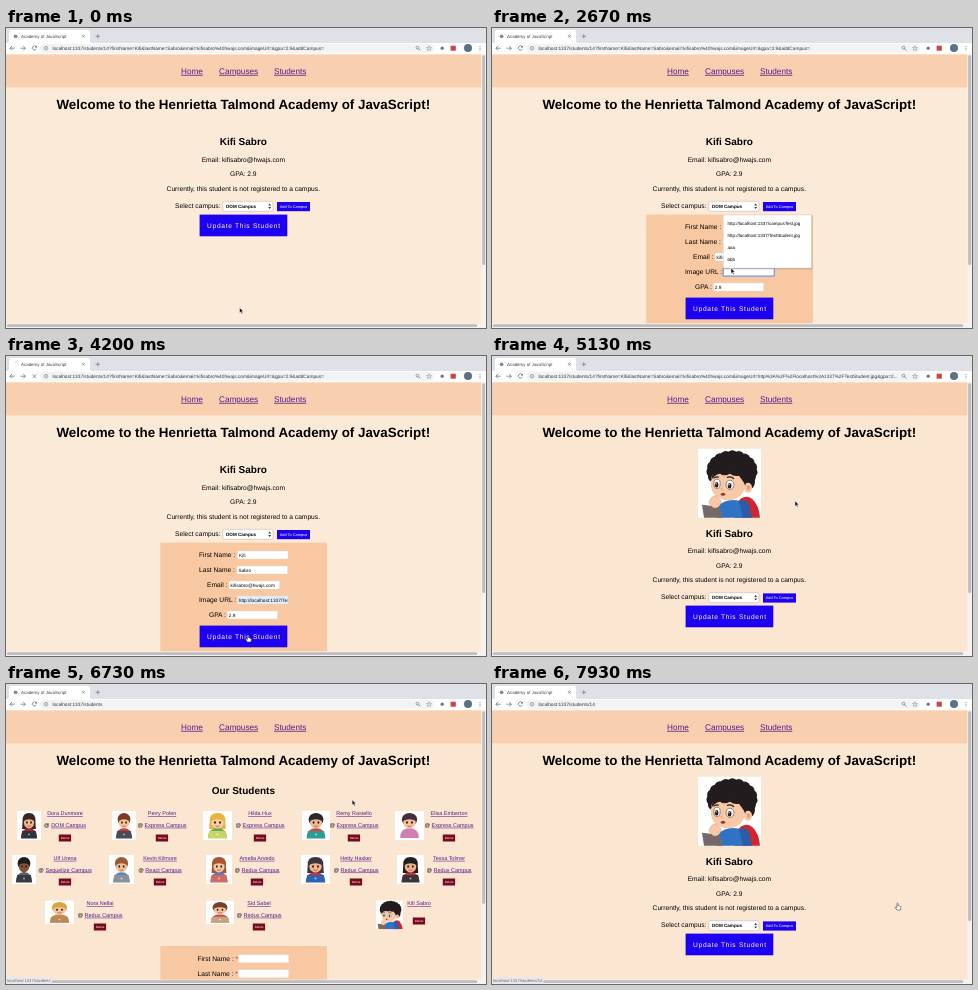
An HTML page for the animation above (8 s loop, 480x300 px).

```html
<!DOCTYPE html>
<html lang="en">
<head>
<meta charset="utf-8">
<title>Academy of JavaScript</title>
<style>
  html, body { margin: 0; width: 100%; height: 100%; overflow: hidden; }
  svg { display: block; width: 100vw; height: 100vh; font-family: "Liberation Sans", Arial, sans-serif; }
  text { white-space: pre; text-rendering: geometricPrecision; }
</style>
</head>
<body>
<svg id="stage" viewBox="0 0 480 300"></svg>
<script>
const LOOP = 8000, MID = 237.3, SHIFT = 63.4;
const BLUE = '#1d00f0', LINK = '#551a8b', PANEL = '#f7c8a1';
const stage = document.getElementById('stage');
const $ = id => document.getElementById(id);

const rect = (x, y, w, h, fill, more = '') =>
  `<rect x="${x}" y="${y}" width="${w}" height="${h}" fill="${fill}" ${more}/>`;
const oval = (x, y, rx, ry, fill, more = '') =>
  `<ellipse cx="${x}" cy="${y}" rx="${rx}" ry="${ry}" fill="${fill}" ${more}/>`;
const path = (d, fill, more = '') => `<path d="${d}" fill="${fill}" ${more}/>`;
const line = (d, color = '#5f6368', w = 0.7) => path(d, 'none', `stroke="${color}" stroke-width="${w}"`);
const text = (x, y, size, s, more = '') => `<text x="${x}" y="${y}" font-size="${size}" ${more}>${s}</text>`;
const mid = (x, y, size, s, more = '') => text(x, y, size, s, `text-anchor="middle" ${more}`);
const link = (x, y, size, s, more = '') => text(x, y, size, s, `fill="${LINK}" text-decoration="underline" ${more}`);
const group = (id, body, more = '') => `<g id="${id}" ${more}>${body}</g>`;
const bold = 'font-weight="bold"';

function browser() {
  return rect(0, 0, 480, 16, '#dee1e6') +
    path('M0 15.5Q3 15.5 3 12.5V5Q3 2 6 2H81Q84 2 84 5V12.5Q84 15.5 87 15.5Z', '#fff') +
    group('icon', oval(9.6, 8.3, 1.9, 1.9, '#858c97')) +
    group('spinner', line('M7.6 8.3A2 2 0 0 1 9.6 6.3', '#b9bdc4', 0.6)) +
    text(15, 9.9, 4.45, 'Academy of JavaScript', 'fill="#3c4043"') +
    line('M76 6.9l2.8 2.8m0-2.8l-2.8 2.8M89.6 8.3h4.4m-2.2-2.2v4.4', '#5f6368', 0.6) +
    rect(0, 15, 480, 11.2, '#fff') +
    rect(34, 15.8, 394, 9, '#f1f3f4', 'rx="4.5"') +
    line('M8.6 20.2H4M6 18l-2.2 2.2L6 22.4') +
    line('M14.6 20.2h4.6M17.2 18l2.2 2.2-2.2 2.2') +
    group('reload', line('M30.2 18.8A2.1 2.1 0 1 0 30.4 20.8') + path('M30.9 17.4v2.2h-2.2z', '#5f6368')) +
    group('stop', line('M26.7 18.4l3.6 3.6m0-3.6l-3.6 3.6')) +
    oval(40, 20.2, 1.8, 1.8, 'none', 'stroke="#5f6368" stroke-width=".5"') +
    line('M40 19.9v1.3M40 18.9v.5', '#5f6368', 0.5) +
    `<text id="url" x="46.4" y="21.9" font-size="4.75" fill="#33363a"></text>` +
    oval(411.5, 19.7, 1.4, 1.4, 'none', 'stroke="#5f6368" stroke-width=".6"') +
    line('M412.5 20.7l1.7 1.7') +
    path('M423 17.8l.7 1.6 1.7.2-1.3 1.1.4 1.7-1.5-.9-1.5.9.4-1.7-1.3-1.1 1.7-.2z', 'none', 'stroke="#5f6368" stroke-width=".4"') +
    oval(436.2, 20.2, 1.6, 1.6, '#6c7076') + rect(444.6, 17.7, 5.2, 5, '#cb4440') +
    oval(462, 20.1, 4, 4, '#5c7284') +
    [18.4, 20.2, 22].map(y => oval(474, y, 0.5, 0.5, '#5f6368')).join('');
}

function header() {
  return rect(0, 26.2, 475.5, 33.2, '#f8d0b0') +
    link(175, 45.8, 8.2, 'Home') + link(213, 45.8, 8.2, 'Campuses') + link(268, 45.8, 8.2, 'Students') +
    mid(MID, 80.6, 13.38, 'Welcome to the Henrietta Talmond Academy of JavaScript!', bold);
}

function boy() {
  const skin = '#f8c9a6', ink = '#231c1f';
  const curls = Array.from({ length: 13 }, (_, i) => {
    const a = 2.75 + i * 0.33;
    return oval(34 + 20 * Math.cos(a), 22 + 15 * Math.sin(a), 5.6, 5.6, ink);
  }).join('');
  return rect(0, 0, 63, 69, '#fff') +
    path('M38 55Q46 44 54 50Q61 56 62 69H36Z', '#cf2630') +
    path('M19 58Q28 49 41 52L47 69H19Z', '#2f74c4') +
    path('M41 53Q48 49 51 56L54 69H45Z', '#2a5da8') +
    oval(35, 23, 21, 16, ink) + curls + oval(50, 33, 7, 8, ink) +
    oval(50, 39, 4, 5, skin) + oval(50.4, 39, 1.8, 2.8, '#e5a280') +
    path('M13 31Q14 22 22 24Q32 19 41 25Q47 31 47 39Q44 49 34 51Q21 53 15 44Q12 38 13 31Z', skin) +
    path('M13 32Q15 18 28 18Q44 16 48 37Q44 31 41 27Q36 28 32 25Q26 28 22 25Q16 26 13 32Z', ink) +
    [[19, 35, 3.2], [32, 36, 4]].map(([x, y, r]) =>
      oval(x, y, r, 4.6, '#fff', 'stroke="#5a3a34" stroke-width=".6"') +
      oval(x - 0.4, y + 1, 1.9, 2.7, '#2b1a18') + oval(x - 1, y, 0.7, 0.8, '#fff')).join('') +
    line('M15.5 29.5q3-2 5.5-1M29 28.6q4-1.5 7 1.5', ink, 1.2) +
    line('M24 39q-1.5 2 .6 2.2', '#d98e69', 0.8) +
    oval(25, 45.4, 2.2, 1.5, '#8c3c34') +
    path('M4 56L21 58 25 69H6Z', '#77686a') +
    path('M11 54Q13 47 18 47L23 52Q23 60 15 59Z', skin, 'stroke="#c98a68" stroke-width=".4"');
}

function button(y) {
  return rect(193.6, y - 0.4, 87.7, 21.7, BLUE) +
    text(201, y + 13, 6.67, 'Update This Student', 'fill="#fff" letter-spacing=".69"');
}

function profile() {
  return mid(MID, 117.3, 10, 'Kifi Sabro', bold) +
    mid(MID, 134, 6.67, 'Email: kifisabro@hwajs.com') +
    mid(MID, 148.3, 6.67, 'GPA: 2.9') +
    mid(MID, 162.7, 6.67, 'Currently, this student is not registered to a campus.') +
    text(169, 179.8, 6.67, 'Select campus:') +
    rect(216.7, 173.3, 50.3, 10, '#fff', 'rx="1.8" stroke="#b5aca5" stroke-width=".5"') +
    text(220, 180, 4.6, 'DOM Campus', bold) +
    path('M262.3 177.6l1.4-2 1.4 2zM262.3 179l1.4 2 1.4-2z', '#333') +
    rect(271, 174, 33, 9.2, BLUE) +
    text(273.7, 180.1, 3.9, 'Add To Campus', 'fill="#fff"');
}

const field = (x, y, fill = '#fff') =>
  rect(x, y - 4, 50.5, 8, fill, 'stroke="#e4d5c8" stroke-width=".4"');

function form() {
  const rows = [['First Name :', 193, 231.5, 'Kifi'], ['Last Name :', 193, 231, 'Sabro'],
    ['Email :', 201, 223, 'kifisabro@hwajs.com'], ['Image URL :', 193, 231.5, ''], ['GPA :', 203, 221.3, '2.9']];
  return rect(154.3, 186.6, 166.7, 109, PANEL) +
    rows.map(([label, x, box, value], i) => {
      const y = 199 + 15 * i;
      return text(x, y + 2.3, 6.67, label) + field(box, y) + text(box + 1.5, y + 1.8, 4.7, value);
    }).join('') +
    group('filled', field(231.5, 244, '#e3ecfb') +
      `<svg x="231.5" y="240" width="50" height="8">${text(1.3, 5.8, 4.7, 'http://localhost:1337/TestStudent.jpg')}</svg>`) +
    group('focus', rect(231.3, 239.8, 51, 8.4, '#fff', 'stroke="#6d9ae0" stroke-width="1.2" rx=".5"'));
}

function menu() {
  const items = ['http://localhost:1337/campusTest.jpg', 'http://localhost:1337/TestStudent.jpg', 'aaa', 'bbb'];
  return rect(231.5, 188, 89, 53.5, '#000', 'opacity=".14" rx="1"') +
    rect(231.3, 187, 88.2, 53, '#fff', 'rx=".8" stroke="#cfcac6" stroke-width=".4"') +
    rect(231.5, 0, 87.8, 12, '#dfe2e6', 'id="hover"') +
    items.map((s, i) => text(235.5, 197.1 + 12 * i, 4.5, s)).join('');
}

// name, campus, text centre, picture x, picture width, hair, skin, shirt, desk, long hair
const students = [
  ['Dora Dunmore', 'DOM', 59, 11, 24, '#3a2522', '#eeb591', '#a12a35', '#32343c', 1],
  ['Perry Polen', 'Express', 156, 106, 24, '#7d3a22', '#f5c39c', '#d03a35', '#4a4c55', 0],
  ['Hilda Hux', 'Express', 254, 197, 29, '#e8b43c', '#f7cba4', '#6aa84f', '#c7d56a', 1],
  ['Remy Rastello', 'Express', 348, 296, 28, '#33262a', '#f1bb95', '#d8443c', '#2e9c93', 0],
  ['Elisa Emberton', 'Express', 443, 389, 29, '#44303a', '#f3c3a0', '#d07fb5', '', 0],
  ['Ulf Urena', 'Sequelize', 59, 6, 24, '#211a1a', '#83543a', '#5b6068', '#383a40', 0],
  ['Kevin Kilmore', 'React', 154, 103, 25, '#9a5c34', '#f0be98', '#4f8dc0', '#8b9097', 0],
  ['Amelia Arvedo', 'Redux', 251, 200, 26, '#a8552f', '#f5c6a2', '#5a78c0', '#d06a62', 1],
  ['Hetty Hasker', 'Redux', 350, 295, 29, '#3b3440', '#efb58e', '#c8352f', '#2c63b2', 1],
  ['Tessa Tolmer', 'Redux', 443, 391, 27, '#241d20', '#eeb48e', '#b7343a', '#3a3638', 1],
  ['Nora Nellai', 'Redux', 94, 39, 29, '#dba441', '#f3c59b', '#c98b4a', '#b78a58', 0],
  ['Sid Sabel', 'Redux', 253, 200, 28, '#77412a', '#f3c19b', '#cf4a41', '#c3a47c', 0],
  ['Kifi Sabro', '', 413, 370, 27]
];

function kid(hair, skin, shirt, desk, long) {
  return rect(0, 0, 28, 29, '#fff') +
    (long ? path('M6.5 10Q6 2 14 2T21.5 10L22 18H6Z', hair) : oval(14, 8.5, 7.4, 6.6, hair)) +
    path('M5 27Q5 17 14 17T23 27Z', shirt) + oval(14, 11.5, 6, 6, skin) +
    path('M7.6 10Q9 3 15 4T20.4 10Q14 6.5 7.6 10Z', hair) +
    oval(11.6, 11.5, 0.9, 1.3, '#2a1d1b') + oval(16.4, 11.5, 0.9, 1.3, '#2a1d1b') +
    line('M12 14.8q2 1.4 4 0', '#8e3b30', 0.6) +
    (desk ? path('M6 20H22L23.5 27.5H4.5Z', desk) + oval(14, 23.6, 1, 1, '#fff', 'opacity=".6"') : '');
}

function card([name, campus, x, px, w, ...look], i) {
  const last = !look.length, row = Math.floor(i / 5), y = [131, 175.8, 221][row];
  const low = row === 2 && !last, top = low ? 216.5 : [127, 171, 216.2][row], h = low ? 23.5 : 29;
  const by = last ? 237 : [154, 198, 243][row];
  const campusText = campus && mid(x, y + 11.7, 5.5,
    `@ <tspan fill="${LINK}" text-decoration="underline">${campus} Campus</tspan>`);
  return `<svg x="${px}" y="${top}" width="${w}" height="${h}" preserveAspectRatio="none" viewBox="${last ? '0 0 63 69' : '0 0 28 29'}">` +
    (last ? boy() : kid(...look)) + '</svg>' +
    mid(x, y, 5.45, name, `fill="${LINK}" text-decoration="underline"`) + campusText +
    rect(x - 6.2, by - 3.5, 12.3, 7, '#78091c') + mid(x, by + 1.1, 3, 'Delete', 'fill="#fff"');
}

function roster() {
  const label = (y, s) => text(191.5, y + 2.3, 6.67, `${s} : <tspan fill="#e02020">*</tspan>`) + field(232.3, y);
  return mid(MID, 109.9, 10, 'Our Students', bold) + students.map(card).join('') +
    rect(154.3, 262, 166.7, 34, PANEL) + label(274.8, 'First Name') + label(289.8, 'Last Name');
}

function pointers() {
  const edge = 'stroke="#fff" stroke-width=".5"';
  return group('arrow', path('M0 0V5.6L1.3 4.4 2.2 6.5 3.2 6.1 2.3 4H4Z', '#111', edge)) +
    group('hand', path('M-.6 0Q0-.7.6 0V2.2L3 3Q3.6 3.3 3.4 4.4L2.8 6.5H-.6L-2.4 3.9Q-2.2 3-1.3 3.6L-.6 4.2Z', '#fff', 'stroke="#222" stroke-width=".5"')) +
    group('beam', line('M-1.2-3Q0-3 0-2V2Q0 3-1.2 3M1.2-3Q0-3 0-2M0 2Q0 3 1.2 3', '#222', 0.6));
}

stage.innerHTML = rect(0, 0, 480, 300, '#fcead9', 'id="page"') + header() +
  group('photo', boy(), 'transform="translate(206 92.8)"') +
  group('profile', profile()) + group('form', form()) + group('update', button(0)) +
  group('menu', menu()) + group('roster', roster()) +
  rect(475.5, 26.2, 4.5, 274, '#f5f3f2') + rect(476.2, 27, 3, 210, '#bdbdbf', 'rx="1.5" id="thumb"') +
  rect(0, 295.6, 475.5, 4.4, '#f5f3f2') + rect(0.8, 296.2, 470.5, 2.9, '#bdbdbf', 'rx="1.5"') +
  group('status', path('M0 293H0V300H50V294.5Q50 293 48.5 293Z', '#e9e9eb', 'id="bubble"') +
    '<text id="target" x="1" y="298" font-size="4.15" fill="#66686b"></text>') +
  browser() + group('cursor', pointers());

const ROOT = 'localhost:1337/students';
const query = image => `${ROOT}/14?firstName=Kifi&lastName=Sabro&email=kifisabro%40hwajs.com&imageUrl=${image}&gpa=2`;
const LONG = query('http%3A%2F%2Flocalhost%3A1337%2FTestStudent.jpg') + '...';

const T = { open: 1070, menu: 2670, pick: 3330, send: 3930, saved: 4400, ready: 5130, list: 6130, detail: 7800 };

// time, x, y
const track = [[0, 233.5, 279.5], [330, 233.5, 279.5], [600, 245, 245], [800, 257, 208], [930, 260, 199],
  [1600, 260, 199], [1900, 249, 222], [2200, 240, 243], [2399, 240, 243], [2400, 239, 243],
  [2669, 239, 243], [2670, 239, 240], [2870, 239, 238], [3200, 243, 207], [3600, 243, 207], [3730, 242, 279.5],
  [4730, 242, 279.5], [4930, 302, 176], [5129, 302, 176], [5130, 303, 145], [5200, 301, 136],
  [5399, 301, 136], [5470, 297, 81], [5650, 297, 81], [5800, 285, 42], [6500, 285, 42],
  [6730, 346, 115.5], [7130, 398, 203], [7330, 405.5, 219.5], [LOOP, 405.5, 219.5]];

// time from which each pointer shape is shown
const shapes = [[0, 'arrow'], [800, 'hand'], [T.open, 'beam'], [T.menu, 'arrow'], [T.pick, 'beam'],
  [3700, 'hand'], [T.saved, 'arrow'], [5760, 'hand'], [6540, 'arrow'], [7300, 'hand']];

function position(t) {
  const i = Math.max(1, track.findIndex(k => k[0] > t));
  const [t0, x0, y0] = track[i - 1], [t1, x1, y1] = track[i];
  const p = (t - t0) / (t1 - t0);
  return [x0 + (x1 - x0) * p, y0 + (y1 - y0) * p];
}

const show = (id, on) => $(id).setAttribute('display', on ? 'inline' : 'none');
const move = (id, x, y) => $(id).setAttribute('transform', `translate(${x} ${y})`);

function draw(t) {
  const within = (a, b) => t >= a && t < b;
  const saved = t >= T.saved, list = within(T.list, T.detail), form = within(T.open, T.saved);
  const loading = within(T.send, T.ready);

  $('page').setAttribute('fill', saved ? '#fbe6d2' : '#fcead9');
  show('photo', saved && !list);
  show('profile', !list);
  move('profile', 0, saved ? SHIFT : 0);
  show('form', form);
  show('update', !list);
  move('update', 0, form ? 270 : saved ? 250 : 187);
  show('roster', list);
  $('thumb').setAttribute('height', list ? 193 : 210);

  const [x, y] = position(t);
  const row = Math.floor((y - 189.5) / 12);
  show('menu', within(T.menu, T.pick));
  show('hover', row >= 0 && row < 4);
  $('hover').setAttribute('y', 189.5 + 12 * row);
  show('focus', within(T.menu, T.pick));
  show('filled', within(T.pick, T.saved));

  show('icon', !loading);
  show('spinner', loading);
  $('spinner').setAttribute('transform', `rotate(${t * 0.36 % 360} 9.6 8.3)`);
  show('reload', !loading);
  show('stop', loading);
  $('url').textContent = t < T.saved ? query('') + '.9&addCampus=' :
    t < T.list ? LONG : list ? ROOT : ROOT + '/14';

  const onStudent = t >= 7300;
  show('status', within(5780, 6900) || onStudent);
  $('target').textContent = onStudent ? ROOT + '/14' : ROOT;
  $('bubble').setAttribute('transform', `scale(${onStudent ? 1.03 : 0.92} 1)`);

  move('cursor', x, y);
  const shape = shapes.filter(s => s[0] <= t).pop()[1];
  ['arrow', 'hand', 'beam'].forEach(id => show(id, id === shape));
}

const start = performance.now();
function tick() {
  draw((performance.now() - start) % LOOP);
  requestAnimationFrame(tick);
}
tick();
</script>
</body>
</html>
```
